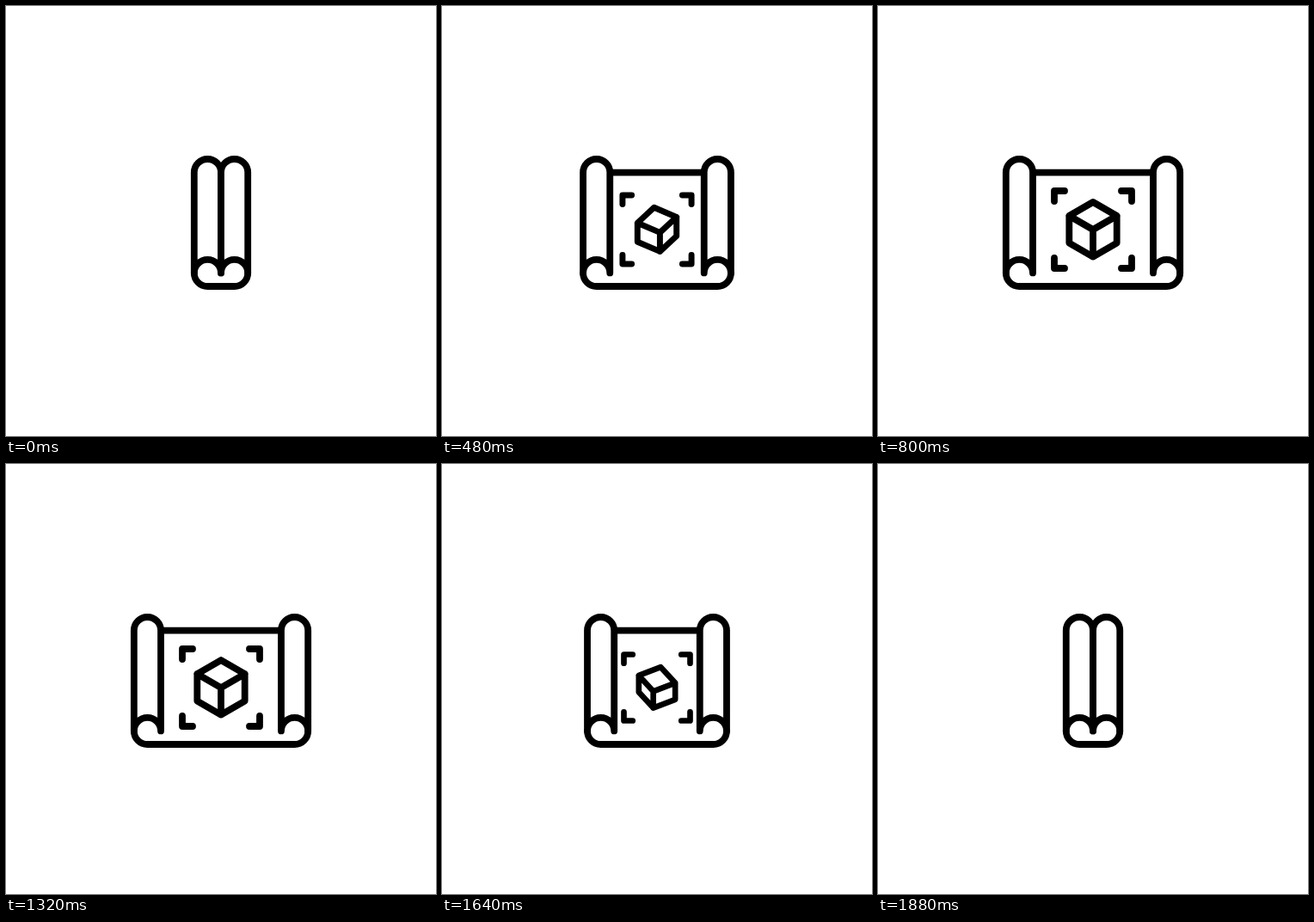
These frames come from a looping animation (500x500 px, 1900 ms). An HTML page:

```html
<!DOCTYPE html>
<html>
<head>
<meta charset="utf-8">
<style>
html, body { margin: 0; height: 100%; overflow: hidden; background: #fff; }
svg { display: block; width: 100vw; height: 100vh; }
path { fill: none; stroke: #000; stroke-width: 7.8; stroke-linecap: round; stroke-linejoin: round; }
.roll { fill: #fff; }
</style>
</head>
<body>
<svg viewBox="0 0 500 500">
  <defs>
    <!-- left roll, its inner edge at x = 0 -->
    <g id="roll">
      <path class="roll" d="M-31.2 310.4V193.6a15.6 15.6 0 0 1 31.2 0V310.4a15.6 15.6 0 0 0 -31.2 0"/>
    </g>
    <path id="corner" d="M-45 -33V-45H-33"/>
  </defs>
  <path id="sheet"/>
  <g id="print">
    <use href="#corner"/>
    <use href="#corner" transform="scale(-1 1)"/>
    <use href="#corner" transform="scale(1 -1)"/>
    <use href="#corner" transform="scale(-1 -1)"/>
    <path id="cube"/>
  </g>
  <use id="left" href="#roll"/>
  <use id="right" href="#roll"/>
</svg>
<script>
const $ = id => document.getElementById(id);
const LOOP = 1900, START = 200, MOVE = 600, CLOSE = 1300;

// cubic-bezier(.67, 0, 0, 1)
function ease(x) {
  if (x <= 0) return 0;
  if (x >= 1) return 1;
  let lo = 0, hi = 1, s;
  for (let i = 0; i < 30; i++) {
    s = (lo + hi) / 2;
    if (2.01 * s * (1 - s) ** 2 + s ** 3 < x) lo = s; else hi = s;
  }
  return s * s * (3 - 2 * s);
}

// The cube morphs from a flat square (seen from above) to an isometric view.
function cubePath(k, flip) {
  const at = (x, y, sx, sy) => {
    const mix = (a, b) => a * k + b * 17.5 * (1 - k);
    return (flip * mix(x, sx)).toFixed(2) + ' ' + mix(y, sy).toFixed(2);
  };
  const back = at(0, -32, -1, -1), front = at(0, 0, 1, 1), bottom = at(0, 31.6, 1, 1);
  const l = at(-27.7, -16, -1, 1), lowL = at(-27.7, 15.6, -1, 1);
  const r = at(27.7, -16, 1, -1), lowR = at(27.7, 15.6, 1, -1);
  return `M${back}L${r}L${lowR}L${bottom}L${lowL}L${l}ZM${l}L${front}L${r}M${front}L${bottom}`;
}

function draw(now) {
  const t = now % LOOP, closing = t >= CLOSE;
  const k = ease((closing ? LOOP - t : t - START) / MOVE);
  const d = 70 * k, x = 250 - d, w = 2 * d;
  $('sheet').setAttribute('d',
    `M${x} 193.6h${w}M${x - 31.2} 310.4a15.6 15.6 0 0 0 15.6 15.6h${w + 31.2}a15.6 15.6 0 0 0 15.6 -15.6`);
  $('left').setAttribute('transform', `translate(${x} 0)`);
  $('right').setAttribute('transform', `translate(${250 + d} 0) scale(-1 1)`);
  $('print').setAttribute('transform', `translate(250 260) scale(${0.5 + k / 2})`);
  $('cube').setAttribute('d', cubePath(k, closing ? -1 : 1));
}

const begin = performance.now();
function tick() {
  draw(performance.now() - begin);
  requestAnimationFrame(tick);
}
tick();
</script>
</body>
</html>
```
